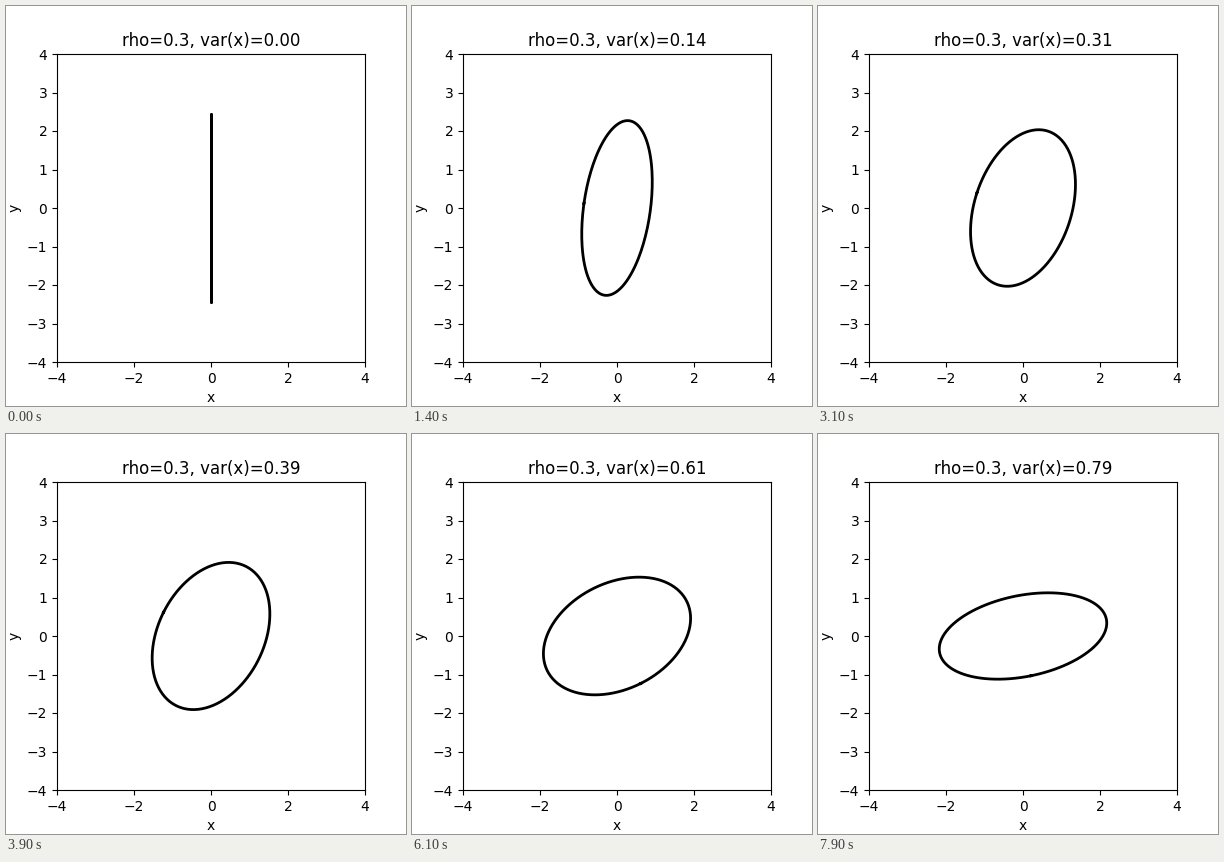
A matplotlib script that plays this animation: 400x400 px, repeating every 8 s.

```python
import numpy as np
import matplotlib.pyplot as plt
from matplotlib.animation import FuncAnimation

RHO = 0.3
FRAMES = 80
RADIUS = np.sqrt(-2 * np.log(0.05))  # 95% contour of a bivariate normal

theta = np.linspace(0, 2 * np.pi, 200)
circle = RADIUS * np.array([np.cos(theta), np.sin(theta)])


def contour(var_x):
    """Confidence ellipse for variances var_x and 1 - var_x."""
    var_y = 1 - var_x
    cov = RHO * np.sqrt(var_x * var_y)
    vals, vecs = np.linalg.eigh([[var_x, cov], [cov, var_y]])
    return vecs @ (np.sqrt(np.clip(vals, 0, None))[:, None] * circle)


fig, ax = plt.subplots(figsize=(4, 4), dpi=100)
ax.set_aspect("equal")
ax.set(xlim=(-4, 4), ylim=(-4, 4), xlabel="x", ylabel="y")
ax.set_xticks(range(-4, 5, 2))
ax.set_yticks(range(-4, 5))
line, = ax.plot([], [], color="black", lw=2)
title = ax.set_title("")


def update(i):
    var_x = i / 100
    line.set_data(*contour(var_x))
    title.set_text(f"rho={RHO}, var(x)={var_x:.2f}")
    return line, title


anim = FuncAnimation(fig, update, frames=FRAMES, interval=100,
                     repeat=True, repeat_delay=0)
plt.show()
```
